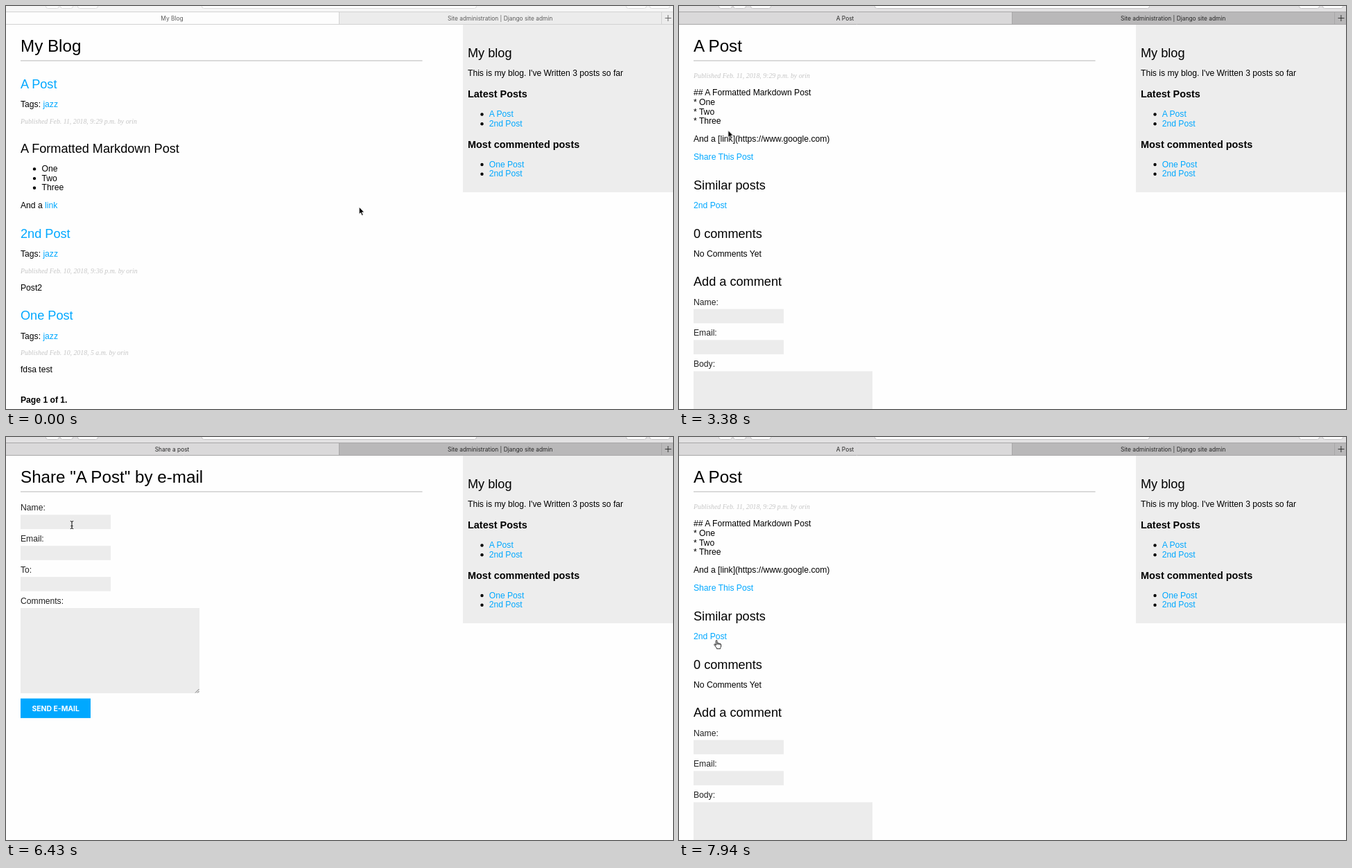
Animation of 962x582 px, one loop 8000 ms. Source, as an HTML page:

```html
<!DOCTYPE html>
<html lang="en">
<head>
<meta charset="utf-8">
<title>My Blog</title>
<style>
html, body { margin: 0; width: 100%; height: 100%; overflow: hidden; background: #fefefe; }
svg { display: block; width: 962px; height: 582px; }
text { font: 12.15px "Liberation Sans", Arial, sans-serif; fill: #000; white-space: pre; }
.h1 { font-size: 24.2px; }
.h2 { font-size: 18.15px; }
.h3 { font-size: 14.45px; font-weight: bold; }
.bold { font-weight: bold; }
.link { fill: #00a8ff; }
.date { font: italic 9.8px "Liberation Serif", "Times New Roman", serif; fill: #c6c6c6; }
.label { fill: #222; }
.field { fill: #ececec; }
.paper { fill: #fefefe; }
.rule { fill: #c4c4c4; }
.tab { font: 8.4px Inter, Roboto, sans-serif; text-anchor: middle; fill: var(--ink); }
.send { font: bold 10.4px Inter, Roboto, sans-serif; text-anchor: middle; fill: #fff; }

.off { --bar: #f6f6f6; --line: #d2d2d2; --front: #fdfdfd; --back: #ececec; --ink: #5c5c5c; --edge: #dcdcdc; }
.on { --bar: #e2e1e2; --line: #a8a7a8; --front: #dad9da; --back: #b9b8b9; --ink: #262626; --edge: #c4c3c4; }

/* One percent of the loop is 80 ms. */
.anim { animation: 8s step-end infinite; }
.blur { animation-name: blur; }
.list { animation-name: list; }
.share { animation-name: share; }
.dim { animation-name: dim; }
.name-list { animation-name: list; }
.name-post { animation-name: name-post; }
.name-share { animation-name: name-share; }
.arrow { animation-name: arrow; }
.beam { animation-name: beam; }
.hand { animation-name: hand; }
.pointer { animation-name: pointer; }

@keyframes blur { 0% { opacity: 1 } 22.875%, 100% { opacity: 0 } }
@keyframes list { 0% { opacity: 1 } 37.5%, 100% { opacity: 0 } }
@keyframes share {
  0% { opacity: 0; transform: none }
  58.125% { opacity: 1; transform: none }
  84.875% { opacity: 1; transform: translateX(130px) }
  86% { opacity: 1; transform: translateX(355px) }
  88.25% { opacity: 1; transform: translateX(880px) }
  90.125%, 100% { opacity: 0; transform: translateX(962px) }
}
@keyframes dim {
  0% { opacity: 0 }
  84.875% { opacity: .1 }
  86% { opacity: .078 }
  88.25% { opacity: .012 }
  90.125%, 100% { opacity: 0 }
}
@keyframes name-post {
  0% { opacity: 0 } 37.5% { opacity: 1 } 58.125% { opacity: 0 } 96.625%, 100% { opacity: 1 }
}
@keyframes name-share { 0% { opacity: 0 } 58.125% { opacity: 1 } 96.625%, 100% { opacity: 0 } }
@keyframes arrow {
  0% { opacity: 1 } 80.375% { opacity: 0 } 90.125% { opacity: 1 } 98.625%, 100% { opacity: 0 }
}
@keyframes beam { 0% { opacity: 0 } 80.375% { opacity: 1 } 90.125%, 100% { opacity: 0 } }
@keyframes hand { 0% { opacity: 0 } 98.625%, 100% { opacity: 1 } }
@keyframes pointer {
  0% { transform: translate(509px, 290px) }
  1.125% { transform: translate(398px, 240px) }
  3% { transform: translate(362px, 198px) }
  5.25% { transform: translate(362px, 198px); animation-timing-function: steps(3, start) }
  8.44% { transform: translate(199px, 77px) }
  9.625% { transform: translate(199px, 77px); animation-timing-function: steps(5, start) }
  15% { transform: translate(83px, 93px); animation-timing-function: steps(5, start) }
  20.625% { transform: translate(67px, 101px); animation-timing-function: steps(6, start) }
  27.375% { transform: translate(54px, 114px) }
  30.625% { transform: translate(54px, 114px); animation-timing-function: steps(2, start) }
  32.625% { transform: translate(48px, 113px) }
  37.25% { transform: translate(48px, 113px); animation-timing-function: steps(8, start) }
  46% { transform: translate(84px, 219px) }
  47% { transform: translate(84px, 219px); animation-timing-function: steps(5, start) }
  52.625% { transform: translate(62px, 217px) }
  59.25% { transform: translate(62px, 217px); animation-timing-function: steps(6, start) }
  66.125% { transform: translate(98px, 57px); animation-timing-function: steps(5, start) }
  71.875% { transform: translate(8px, 6px); animation-timing-function: steps(5, start) }
  77% { transform: translate(20px, 4px) }
  79.25% { transform: translate(20px, 4px); animation-timing-function: steps(2, start) }
  81.5% { transform: translate(95px, 127px) }
  90.125% { transform: translate(88px, 215px) }
  92% { transform: translate(80px, 273px) }
  93.75% { transform: translate(80px, 308px) }
  95.625% { transform: translate(80px, 308px); animation-timing-function: steps(4, start) }
  99.625%, 100% { transform: translate(50px, 293px) }
}
</style>
</head>
<body>
<svg viewBox="0 0 962 582">
  <defs>
    <g id="sidebar">
      <rect x="659" y="27" width="303" height="242" fill="#ededed"/>
      <text class="h2" x="666" y="74">My blog</text>
      <text x="666" y="101">This is my blog. I've Written 3 posts so far</text>
      <text class="h3" x="666" y="132">Latest Posts</text>
      <text class="link" x="696.7" y="160">A Post</text>
      <text class="link" x="696.7" y="173.7">2nd Post</text>
      <text class="h3" x="666" y="204.5">Most commented posts</text>
      <text class="link" x="696.7" y="232.5">One Post</text>
      <text class="link" x="696.7" y="246.2">2nd Post</text>
      <circle cx="686.5" cy="156.5" r="2.2"/>
      <circle cx="686.5" cy="170.2" r="2.2"/>
      <circle cx="686.5" cy="229" r="2.2"/>
      <circle cx="686.5" cy="242.7" r="2.2"/>
    </g>

    <g id="frame">
      <rect class="paper" y="26" width="962" height="556"/>
      <rect class="rule" x="21" y="78.4" width="579.5" height="1.2"/>
      <use href="#sidebar"/>
    </g>

    <g id="chrome">
      <rect width="962" height="8" fill="var(--bar)"/>
      <rect y="9" width="481" height="17" fill="var(--front)"/>
      <rect x="481" y="9" width="481" height="17" fill="var(--back)"/>
      <path d="M0 8.5H962M0 26.5H962M480.5 9V26M945.5 9V26" stroke="var(--line)"/>
      <g fill="#fefefe" stroke="var(--edge)">
        <rect x="57.5" y="-14" width="19" height="17.5" rx="3"/>
        <rect x="78.5" y="-14" width="18" height="17.5" rx="3"/>
        <rect x="103.5" y="-14" width="29" height="17.5" rx="3"/>
        <rect x="282.5" y="-14" width="396" height="17.5" rx="3"/>
        <rect x="894.5" y="-14" width="29" height="17.5" rx="3"/>
        <rect x="928.5" y="-14" width="29" height="17.5" rx="3"/>
      </g>
      <path d="M950.5 17.5H959.5M954.9 13V22" stroke="var(--ink)" stroke-width=".9"/>
      <text class="tab" x="712.7" y="20.5">Site administration | Django site admin</text>
    </g>

    <rect id="input" class="field" width="130" height="20.6"/>
  </defs>

  <g>
    <use href="#frame"/>
    <text class="h1" x="21" y="66">A Post</text>
    <text class="date" x="21" y="104.3">Published Feb. 11, 2018, 9:29 p.m. by orin</text>
    <text x="21" y="129.2">## A Formatted Markdown Post</text>
    <text x="21" y="142.9">* One</text>
    <text x="21" y="156.6">* Two</text>
    <text x="21" y="170.3">* Three</text>
    <text x="21" y="196">And a [link](https://www.google.com)</text>
    <text class="link" x="21" y="221.8">Share This Post</text>
    <text class="h2" x="21" y="264.5">Similar posts</text>
    <text class="link" x="21" y="291.8">2nd Post</text>
    <text class="h2" x="21" y="334.5">0 comments</text>
    <text x="21" y="361.7">No Comments Yet</text>
    <text class="h2" x="21" y="404.3">Add a comment</text>
    <text class="label" x="21" y="431.5">Name:</text>
    <use href="#input" x="21" y="437.6"/>
    <text class="label" x="21" y="476.3">Email:</text>
    <use href="#input" x="21" y="482.4"/>
    <text class="label" x="21" y="521.2">Body:</text>
    <rect class="field" x="21" y="527.5" width="258" height="60"/>
  </g>
  <rect class="anim dim" y="27" width="962" height="555"/>

  <g class="anim list">
    <use href="#frame"/>
    <text class="h1" x="21" y="66">My Blog</text>
    <text class="h2 link" x="21" y="119.2">A Post</text>
    <text x="21" y="146.3">Tags: <tspan class="link">jazz</tspan></text>
    <text class="date" x="21" y="170.1">Published Feb. 11, 2018, 9:29 p.m. by orin</text>
    <text class="h2" x="21" y="211.8">A Formatted Markdown Post</text>
    <circle cx="41" cy="235.4" r="2.2"/>
    <circle cx="41" cy="249.1" r="2.2"/>
    <circle cx="41" cy="262.8" r="2.2"/>
    <text x="51.5" y="239">One</text>
    <text x="51.5" y="252.7">Two</text>
    <text x="51.5" y="266.4">Three</text>
    <text x="21" y="292.2">And a <tspan class="link">link</tspan></text>
    <text class="h2 link" x="21" y="335">2nd Post</text>
    <text x="21" y="362.1">Tags: <tspan class="link">jazz</tspan></text>
    <text class="date" x="21" y="385.9">Published Feb. 10, 2018, 9:36 p.m. by orin</text>
    <text x="21" y="410.7">Post2</text>
    <text class="h2 link" x="21" y="453.4">One Post</text>
    <text x="21" y="480.6">Tags: <tspan class="link">jazz</tspan></text>
    <text class="date" x="21" y="504.4">Published Feb. 10, 2018, 5 a.m. by orin</text>
    <text x="21" y="529.2">fdsa test</text>
    <text class="bold" x="21" y="573.2">Page 1 of 1.</text>
  </g>

  <g class="anim share">
    <rect x="-8" y="27" width="8" height="555" opacity=".085"/>
    <use href="#frame"/>
    <text class="h1" x="21" y="66">Share "A Post" by e-mail</text>
    <text class="label" x="21" y="106.3">Name:</text>
    <use href="#input" x="21" y="112.4"/>
    <text class="label" x="21" y="151.2">Email:</text>
    <use href="#input" x="21" y="157.2"/>
    <text class="label" x="21" y="196">To:</text>
    <use href="#input" x="21" y="202"/>
    <text class="label" x="21" y="240.9">Comments:</text>
    <rect class="field" x="21" y="247" width="258" height="123"/>
    <path d="M273 369.5L278.5 364M276 369.5L278.5 367" stroke="#555" stroke-width=".8"/>
    <rect x="21" y="377.6" width="101" height="28.3" fill="#00a8ff"/>
    <text class="send" x="71.7" y="395.8">SEND E-MAIL</text>
  </g>

  <use href="#chrome" class="on"/>
  <g class="on">
    <text class="tab anim name-list" x="239.5" y="20.5">My Blog</text>
    <text class="tab anim name-post" x="239.5" y="20.5">A Post</text>
    <text class="tab anim name-share" x="239.5" y="20.5">Share a post</text>
  </g>
  <g class="anim blur off">
    <use href="#chrome"/>
    <text class="tab" x="239.5" y="20.5">My Blog</text>
  </g>

  <g class="anim pointer">
    <path class="anim arrow" d="M.3 .3V10.8L2.6 8.6L4.3 12.6L6.2 11.8L4.5 7.9H7.7Z" fill="#000" stroke="#fff" stroke-width=".8"/>
    <path class="anim beam" d="M-2.2 -5.5Q0 -5.5 0 -4V4Q0 5.5 -2.2 5.5M2.2 -5.5Q0 -5.5 0 -4M0 4Q0 5.5 2.2 5.5M-1.5 1.5H1.5" fill="none" stroke="#111"/>
    <path class="anim hand" d="M3.2 8V1.6Q3.2 .5 4.1 .5T5 1.6V4.6Q6.3 3.9 6.9 5Q8.2 4.4 8.8 5.6Q10.6 5.2 10.6 7V9Q10.6 10.5 9.6 11.5V12.8H4.4V11.8L1 7.4Q.4 6.2 1.4 6Q2.2 5.9 3.2 8ZM5 4.6V7M6.9 5V7.2M8.8 5.6V7.4" fill="#fff" stroke="#111" stroke-width=".9" stroke-linejoin="round"/>
  </g>
</svg>
</body>
</html>
```
